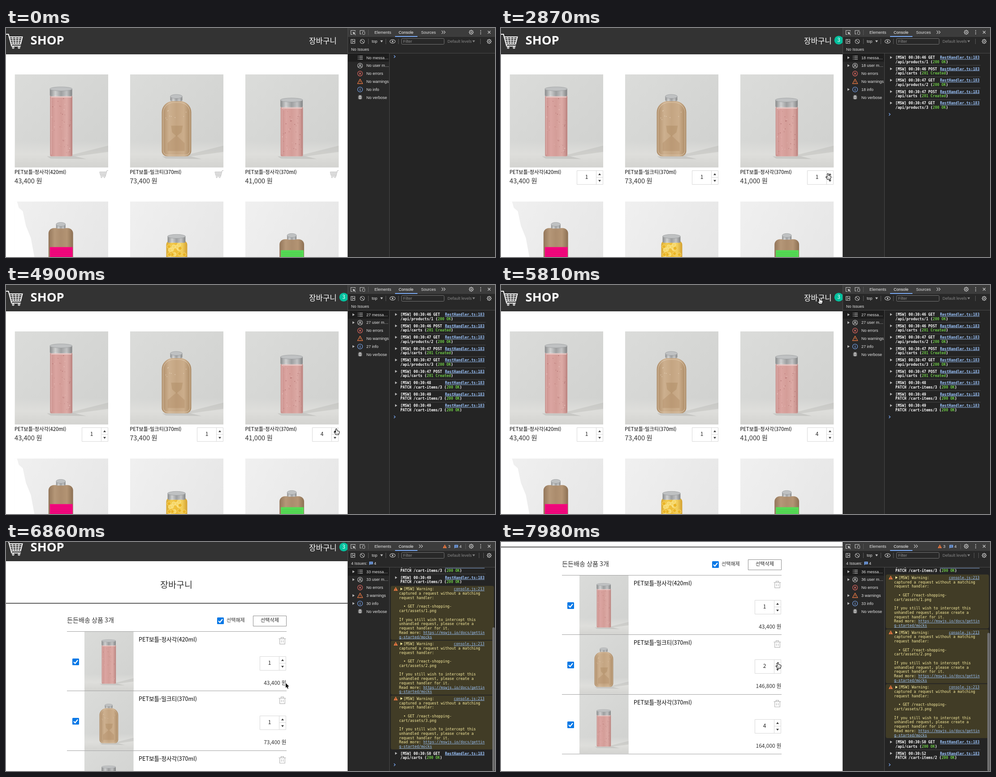
Animation, 1091 px wide and 513 px high, one loop 8000 ms. Source, as an HTML page with a canvas:

```html
<!DOCTYPE html>
<html lang="ko">
<head>
<meta charset="utf-8">
<title>Shop</title>
<style>
html, body { margin: 0; width: 100%; height: 100%; overflow: hidden; background: #fff; }
canvas { display: block; }
</style>
</head>
<body>
<canvas id="stage" width="1091" height="513"></canvas>
<script>
const g = document.getElementById('stage').getContext('2d');
const KR = '"Noto Sans CJK KR","Noto Sans KR","Noto Sans CJK JP",sans-serif';
const UI = '"Liberation Sans",Arial,sans-serif';
const MONO = '"DejaVu Sans Mono",monospace';
const LOOP = 8000, STEP = 70, CHAR = 4.9;
const CART_AT = 5880, IMAGES_AT = 6020, ISSUES_AT = 6160;

// ---------- helpers ----------
function text(s, x, y, font, color, align = 'left') {
  g.font = font; g.fillStyle = color; g.textAlign = align;
  g.fillText(s, x, y);
}
function rect(x, y, w, h, color) { g.fillStyle = color; g.fillRect(x, y, w, h); }
function frame(x, y, w, h, color, r = 0) {
  g.strokeStyle = color; g.lineWidth = 1;
  g.beginPath(); g.roundRect(x, y, w, h, r); g.stroke();
}
function poly(points, close) {
  g.beginPath();
  points.forEach(([x, y], i) => i ? g.lineTo(x, y) : g.moveTo(x, y));
  if (close) g.closePath();
}
function line(color, width, ...points) {
  g.strokeStyle = color; g.lineWidth = width;
  poly(points); g.stroke();
}
function shape(color, ...points) { g.fillStyle = color; poly(points, true); g.fill(); }
function disc(x, y, r, color) {
  g.fillStyle = color; g.beginPath(); g.arc(x, y, r, 0, 7); g.fill();
}
function ring(x, y, r, color, w = 1.1) {
  g.strokeStyle = color; g.lineWidth = w; g.beginPath(); g.arc(x, y, r, 0, 7); g.stroke();
}
function blend(x0, y0, x1, y1, ...colors) {
  const f = g.createLinearGradient(x0, y0, x1, y1);
  colors.forEach((c, i) => f.addColorStop(i / (colors.length - 1), c));
  return f;
}
function at(x, y, draw, sx = 1, sy = sx) {
  g.save(); g.translate(x, y); g.scale(sx, sy); draw(); g.restore();
}
function clip(x, y, w, h, draw) {
  g.save(); g.beginPath(); g.rect(x, y, w, h); g.clip(); draw(); g.restore();
}
function random(seed) {
  return () => (seed = (seed * 16807) % 2147483647) / 2147483647;
}
// keys: [time, a, b, ...]; linear between neighbours, flag taken from the left key
function tween(keys, t) {
  let i = 0;
  while (i < keys.length - 1 && keys[i + 1][0] <= t) i++;
  const a = keys[i], b = keys[i + 1] || a;
  const k = b === a ? 0 : Math.max(0, (t - a[0]) / (b[0] - a[0]));
  return a.map((v, n) => typeof v === 'number' ? v + (b[n] - v) * k : v);
}

// ---------- timeline ----------
const ARROW = 'arrow', HAND = 'hand';
const pointer = [
  [70, 873, 400, ARROW], [210, 520, 372, ARROW], [350, 258, 334, ARROW], [420, 222, 328, HAND],
  [630, 222, 327, HAND], [700, 222, 324, HAND], [840, 222, 324, HAND], [910, 214, 315, HAND],
  [980, 226, 327, HAND], [1050, 219, 325, HAND], [1400, 222, 326, ARROW], [1540, 401, 332, ARROW],
  [1680, 462, 328, ARROW], [1820, 475, 325, HAND], [2310, 477, 325, ARROW], [2520, 680, 331, ARROW],
  [2660, 729, 326, HAND], [3640, 731, 326, HAND], [3850, 731, 326, HAND], [4060, 737, 322, HAND],
  [5110, 737, 322, ARROW], [5460, 715, 70, ARROW], [5600, 711, 31, HAND], [5740, 711, 29, HAND],
  [5810, 711, 29, HAND], [5950, 711, 35, HAND], [6160, 711, 36, ARROW], [6370, 668, 190, ARROW],
  [6580, 624, 316, ARROW], [7280, 624, 316, ARROW], [7420, 620, 288, HAND], [7560, 618, 270, HAND]
];
const scrolling = [[6790, 0], [6860, 16], [6930, 62], [7000, 114], [7070, 142]];

function log(time, stamp, verb, path, status) { return { time, stamp, verb, path, status, h: 25.5 }; }
const logs = [];
[[1330, 46], [2100, 47], [2870, 47]].forEach(([t, s], i) => logs.push(
  log(t, s, 'GET', '/api/products/' + (i + 1), '200 OK'),
  log(t + 280, s, 'POST', '/api/carts', '201 Created')));
[[4200, 48], [4410, 49], [4900, 49]].forEach(([t, s]) =>
  logs.push(log(t, s, '', 'PATCH /cart-items/3', '200 OK')));
for (let n = 1; n <= 3; n++) logs.push({ time: CART_AT, warn: n, h: 122.75 });
logs.push(log(CART_AT, 50, 'GET', '/api/carts', '200 OK'),
  log(7840, 52, '', 'PATCH /cart-items/2', '200 OK'));

const count = (times, t) => times.filter(v => t >= v).length;
const added = [1330, 2100, 2870];
const raised = [4130, 4340, 4830];
const requests = [1330, 1330, 2100, 2100, 2870, 2870, 4200, 4410, 4900, CART_AT, 7770];

const products = [
  { name: 'PET보틀-정사각(420ml)', price: 43400 },
  { name: 'PET보틀-밀크티(370ml)', price: 73400 },
  { name: 'PET보틀-정사각(370ml)', price: 41000 }
];
const won = n => n.toLocaleString('en-US') + ' 원';

// ---------- product photos, on a 209 px square ----------
function lid(x, y, w, h) {
  g.fillStyle = blend(x, 0, x + w, 0, '#8d8f90', '#d7d8d8', '#a2a4a5', '#c9cacb', '#858788');
  g.beginPath(); g.roundRect(x, y + 3, w, h - 3, 3); g.fill();
  for (let i = 2; i < w - 1; i += 2.5) line('rgba(80,80,80,.25)', .6, [x + i, y + 8], [x + i, y + h - 2]);
  g.fillStyle = '#bfc1c2';
  g.beginPath(); g.ellipse(x + w / 2, y + 4.5, w / 2, 4.5, 0, 0, 7); g.fill();
  g.strokeStyle = '#949698'; g.lineWidth = .7; g.stroke();
}
function body(x, y, w, h, r, ...colors) {
  g.fillStyle = blend(x, 0, x + w, 0, ...colors);
  g.beginPath(); g.roundRect(x, y, w, h, r); g.fill();
}
function backdrop(light) {
  rect(0, 0, 209, 209, light ? blend(0, 0, 209, 120, '#f0f0f0', '#e6e6e6')
    : blend(0, 0, 209, 209, '#dbdcda', '#d5d6d4', '#cfd0ce'));
  if (light) return;
  rect(0, 150, 209, 59, blend(0, 150, 0, 209, 'rgba(224,224,221,0)', '#dededb', '#d3d3d0'));
  shape('rgba(150,150,146,.22)', [126, 181], [209, 160], [209, 174], [128, 185]);
  shape('rgba(140,140,136,.25)', [72, 184], [136, 184], [160, 190], [80, 189]);
}
function smoothie(top) {
  backdrop();
  const y = top + 18, rnd = random(top + 5);
  body(79, y, 50, 184 - y, [5, 5, 3, 3], '#c98f8b', '#dba5a1', '#d49d98', '#dcaaa5', '#c18a86');
  rect(81, y + 1, 46, 5, 'rgba(240,215,212,.65)');
  line('rgba(255,235,232,.4)', 1.2, [82, y + 6], [82, 180]);
  line('rgba(150,90,88,.35)', 1, [126.5, y + 6], [126.5, 181]);
  for (let i = 0; i < 45; i++)
    disc(83 + rnd() * 42, y + 8 + rnd() * (168 - y), .4 + rnd() * .6, i % 3 ? 'rgba(150,75,78,.55)' : 'rgba(255,225,220,.6)');
  lid(78.5, top, 50, 21);
}
function milkTea() {
  backdrop();
  rect(92, 57, 23, 6, '#cbb79f');
  body(71, 60, 66, 124, [25, 25, 12, 12], '#ad8c68', '#cdb08f', '#c4a582', '#cbad8b', '#a98863');
  g.strokeStyle = 'rgba(236,218,195,.55)'; g.lineWidth = 1.2;
  g.beginPath(); g.roundRect(74, 63, 60, 118, [23, 23, 10, 10]); g.stroke();
  shape('rgba(160,122,82,.3)', [92, 115], [118, 115], [115, 130], [104, 139], [94, 130]);
  shape('rgba(160,122,82,.28)', [104, 137], [122, 154], [122, 172], [84, 172], [84, 154]);
  const rnd = random(21);
  for (let i = 0; i < 9; i++) disc(80 + rnd() * 46, 78 + rnd() * 26, .8, 'rgba(245,230,210,.7)');
  lid(90, 45, 27, 15);
}
function labelled(left, top, color, labelY) {
  backdrop(true);
  if (left < 76) shape('#fff', [0, 0], [5, 0], [9, 14], [18, 22], [25, 55], [36, 82], [44, 125], [0, 125]);
  rect(left + 17, top + 11, 20, 6, '#b9a48c');
  body(left, top + 13, 55, 130, [12, 12, 4, 4], '#93765a', '#b59778', '#ab8c6d', '#b39474', '#8c7053');
  rect(left + 3, labelY, 51, 60, color);
  for (let i = 0; i < 5; i++) line('rgba(0,0,0,.14)', .8, [left + 5, labelY + 5 + i * 4], [left + 51, labelY + 5 + i * 4]);
  lid(left + 17, top, 21, 14);
}
function lemons() {
  backdrop(true);
  body(81, 88, 47, 121, [9, 9, 3, 3], '#d9aa35', '#f2ca4c', '#eebd37', '#f3d05c', '#d3a02f');
  const rnd = random(77);
  for (let i = 0; i < 22; i++) {
    const x = 87 + rnd() * 35, y = 97 + rnd() * 34;
    disc(x, y, 4.5, i % 2 ? '#f6d768' : '#eab526');
    ring(x, y, 4, 'rgba(255,240,170,.8)', .8);
  }
  lid(84, 74, 40, 19);
}
const photos = [
  () => smoothie(28), milkTea, () => smoothie(53),
  () => labelled(75.5, 47, '#f4077e', 102.5), lemons, () => labelled(76.5, 72, '#55dc55', 109.5)
];
function photo(i, x, y, w, h) {
  const k = Math.max(w, h) / 209;
  clip(x, y, w, h, () => at(x - (h - w) / 2, y, photos[i], k));
}

// ---------- page parts ----------
function trolley(color, w) {
  line(color, w, [0, 14], [5.5, 14], [12.5, 40.5], [33, 40.5]);
  line(color, w, [7, 20], [36.5, 20], [32.5, 36], [11.5, 36]);
  for (let i = 1; i < 4; i++) {
    line(color, w * .7, [7 + i * 7.3, 20], [11.5 + i * 5.2, 36]);
    line(color, w * .7, [7 + i, 20 + i * 4], [36.5 - i, 20 + i * 4]);
  }
  ring(16, 44, 1.8, color, w * .7);
  ring(29, 44, 1.8, color, w * .7);
}
function stepper(x, y, n) {
  rect(x, y, 59, 32, '#fff');
  frame(x + .5, y + .5, 58, 31, '#d8d8d8');
  line('#d8d8d8', 1, [x + 43.5, y], [x + 43.5, y + 32]);
  line('#d8d8d8', 1, [x + 43.5, y + 15.5], [x + 59, y + 15.5]);
  text(n, x + 22, y + 18.5, '12px ' + KR, '#222', 'center');
  shape('#333', [x + 48, y + 10.5], [x + 54, y + 10.5], [x + 51, y + 6.5]);
  shape('#333', [x + 48, y + 21.5], [x + 54, y + 21.5], [x + 51, y + 25.5]);
}
function checkbox(x, y) {
  g.fillStyle = '#0778e6'; g.beginPath(); g.roundRect(x, y, 15, 15, 1.5); g.fill();
  line('#fff', 2.2, [x + 3, y + 7.8], [x + 6.2, y + 11], [x + 12, y + 3.8]);
}
function bin(x, y) {
  const c = '#b5b5b5';
  line(c, 1.2, [x, y + 3.5], [x + 16, y + 3.5]);
  line(c, 1.2, [x + 5, y + 3], [x + 5, y + .6], [x + 11, y + .6], [x + 11, y + 3]);
  line(c, 1.2, [x + 2.2, y + 4], [x + 2.2, y + 15.5], [x + 13.8, y + 15.5], [x + 13.8, y + 4]);
  line(c, 1.2, [x + 6, y + 7], [x + 6, y + 12]);
  line(c, 1.2, [x + 10, y + 7], [x + 10, y + 12]);
}
function header(badge) {
  rect(0, 0, 762, 59, '#333');
  trolley('#fff', 2);
  text('SHOP', 54.5, 37, 'bold 27.5px "Noto Sans","Open Sans",sans-serif', '#fff');
  text('장바구니', 676, 35, '16.8px ' + KR, '#fff');
  if (!badge) return;
  disc(753.5, 27.3, 9.8, '#04c09e');
  text(badge, 753.5, 31, '12px ' + KR, '#fff', 'center');
}
function shop(t) {
  const inCart = count(added, t);
  header(inCart);
  for (let i = 0; i < 6; i++) {
    const x = 19.5 + (i % 3) * 257.2, y = i < 3 ? 104 : 388.5;
    photo(i, x, y, 208.5, 208.5);
    if (i > 2) continue;
    text(products[i].name, x - .5, 327, '11.2px ' + KR, '#000');
    text(won(products[i].price), x - .5, 348, '14.7px ' + KR, '#333');
    if (i < inCart) stepper(Math.round(x + 149.4), 319, i === 2 ? 1 + count(raised, t) : 1);
    else at(x + 208.5, 312, () => trolley('#a8a8a8', 1.6), -.52, .52);
  }
}
function cart(t) {
  header(3);
  text('장바구니', 380, 119, '500 19.6px ' + KR, '#333', 'center');
  rect(0, 152.5, 762, 1.6, '#333');
  text('든든배송 상품 3개', 136, 196, '14.1px ' + KR, '#333');
  checkbox(471, 185);
  text('선택해제', 492, 195.3, '11.1px ' + KR, '#333');
  frame(551.5, 181.5, 74, 23, '#8c8c8c');
  text('선택삭제', 588.5, 195.3, '500 11.1px ' + KR, '#222', 'center');
  products.forEach((p, i) => {
    const y = 216.7 + i * 133.4, n = [1, t >= 7700 ? 2 : 1, 4][i];
    if (t >= IMAGES_AT) photo(i, 175, y, 109.5, 132.6);
    rect(136, Math.round(y - .7), 490, 1, '#a0a0a0');
    text(p.name, 296, y + 22, '12.6px ' + KR, '#000');
    bin(608.5, y + 12.5);
    checkbox(148, Math.round(y + 60));
    stepper(566, Math.round(y + 55), n);
    text(won(p.price * n), 625.5, y + 119, '12px ' + KR, '#333', 'right');
  });
  rect(136, 616.5, 490, 1, '#a0a0a0');
}

// ---------- developer tools ----------
const GREY = '#c4c4c4', EDGE = '#4b4b4b';
function ui(s, x, y, color = '#e3e3e3') { text(s, x, y, '9px ' + UI, color); }
function caret(x, y, color = '#b5b5b5') { shape(color, [x - 2, y - 3], [x + 3, y], [x - 2, y + 3]); }
function down(x, y, color) { shape(color, [x - 3, y - 2], [x + 3, y - 2], [x, y + 2.5]); }
function gear(x, y) {
  for (let i = 0; i < 8; i++) {
    const c = Math.cos(i * Math.PI / 4), s = Math.sin(i * Math.PI / 4);
    line(GREY, 1.7, [x + c * 3.6, y + s * 3.6], [x + c * 5.4, y + s * 5.4]);
  }
  ring(x, y, 3.7, GREY, 1.2);
  disc(x, y, 1.5, GREY);
}
function warnMark(x, y, s, filled) {
  const pts = [[x, y - s], [x + s, y + s * .85], [x - s, y + s * .85]];
  if (filled) shape('#ee7b44', ...pts);
  else line('#ee7b44', 1.2, ...pts, pts[0]);
  line(filled ? '#3a2a1a' : '#ee7b44', 1, [x, y - s * .3], [x, y + s * .25]);
  disc(x, y + s * .58, .6, filled ? '#3a2a1a' : '#ee7b44');
}
function bubble(x, y) {
  shape('#7cacf8', [x - 4, y - 3.5], [x + 4, y - 3.5], [x + 4, y + 2.5], [x - 2, y + 2.5], [x - 4, y + 4.5]);
  line('#28354c', .8, [x - 2.4, y - 1.5], [x + 2.4, y - 1.5]);
  line('#28354c', .8, [x - 2.4, y + .5], [x + 2.4, y + .5]);
}
function chevrons(x, y) {
  [0, 4.5].forEach(d => line(GREY, 1.1, [x + d, y - 3.5], [x + d + 3.5, y], [x + d, y + 3.5]));
}
function noEntry(x, y, r) {
  ring(x, y, r, GREY);
  line(GREY, 1.1, [x - r * .7, y - r * .7], [x + r * .7, y + r * .7]);
}
function toolbar(issues, warned) {
  rect(762, 0, 329, 20, '#3c3c3c');
  line(GREY, 1.1, [773, 14.5], [769.5, 14.5], [769.5, 5.5], [779, 5.5], [779, 8]);
  shape(GREY, [773.5, 8.5], [780.5, 11.3], [777.3, 12.2], [780.5, 15.3], [779.3, 16], [776.3, 13], [775, 15.5]);
  line(GREY, 1.1, [793, 13.5], [790, 13.5], [790, 5.5], [800, 5.5]);
  frame(795.5, 8, 5, 6.5, GREY, 1);
  [[808.5, 4], [808.5, 24], [847.5, 24], [875.5, 24]].forEach(([x, y]) => line('#5a5a5a', 1, [x, y], [x, y + 12]));
  ui('Elements', 822, 13);
  ui('Console', 876, 13, '#fff');
  rect(868, 18, 50, 2, '#7cacf8');
  if (!issues) ui('Sources', 926, 13);
  chevrons(issues ? 921.5 : 972, 9.5);
  if (warned) {
    const x = issues ? 979 : 1004.5;
    warnMark(x, 10, 4.5, true);
    ui(issues ? 3 : 1, x + 7.5, 13);
    if (issues) { bubble(1004.5, 10); ui(4, 1011.5, 13); }
    line('#5a5a5a', 1, [1025.5, 4], [1025.5, 16]);
  }
  gear(1038, 9.5);
  [5.8, 9.5, 13.2].forEach(y => disc(1059, y, 1.1, GREY));
  line(GREY, 1.2, [1075, 6.5], [1081, 12.5]);
  line(GREY, 1.2, [1081, 6.5], [1075, 12.5]);

  frame(769.5, 25.5, 9, 9, GREY);
  line(GREY, 1.1, [772.5, 25], [772.5, 35]);
  shape(GREY, [777, 27.5], [777, 32.5], [774, 30]);
  noEntry(795, 30, 4.8);
  ui('top', 816, 33);
  down(838, 29.8, GREY);
  g.strokeStyle = GREY; g.lineWidth = 1.1;
  g.beginPath(); g.ellipse(862.5, 30, 6, 3.9, 0, 0, 7); g.stroke();
  disc(862.5, 30, 1.8, GREY);
  frame(882.5, 23.5, 95, 13, '#757575', 2);
  ui('Filter', 886, 33.3, '#8d8d8d');
  ui('Default levels', 985, 33, '#858585');
  down(1043.5, 29.8, '#858585');
  (warned ? [1055.5, 1065.5] : [1058.5]).forEach(x => line('#5a5a5a', 1, [x, 24], [x, 36]));
  gear(1078, 30);
  ui(issues ? '4 Issues:' : 'No Issues', 770, 50.5);
  if (issues) { bubble(814.5, 47.5); ui(4, 821, 50.5); }
}
function fit(s, width) {
  g.font = '9px ' + UI;
  if (g.measureText(s).width <= width) return s;
  while (g.measureText(s + '…').width > width) s = s.slice(0, -1);
  return s + '…';
}
const marks = [
  y => [-3.5, 0, 3.5].forEach(d => {
    rect(785, y + d - .6, 1.6, 1.2, GREY); rect(788, y + d - .6, 8, 1.2, GREY);
  }),
  y => {
    ring(790, y, 5.5, GREY); ring(790, y - 1.5, 1.8, GREY);
    g.beginPath(); g.arc(790, y + 5, 4, 3.6, 5.8); g.stroke();
  },
  y => {
    ring(790, y, 5.5, '#e46962');
    line('#e46962', 1.2, [787.8, y - 2.2], [792.2, y + 2.2]);
    line('#e46962', 1.2, [792.2, y - 2.2], [787.8, y + 2.2]);
  },
  y => warnMark(790, y, 5.6),
  y => { ring(790, y, 5.5, '#7cacf8'); rect(789.4, y - .8, 1.3, 3.8, '#7cacf8'); rect(789.4, y - 3, 1.3, 1.3, '#7cacf8'); },
  y => {
    [-2.5, 0, 2.5].forEach(d => line(GREY, 1, [785.5, y + d], [794.5, y + d]));
    rect(787.5, y - 4, 5, 8, GREY);
    rect(789, y - 1.6, 2, .9, '#282828'); rect(789, y + .8, 2, .9, '#282828');
    line(GREY, 1, [787.5, y - 5.5], [790, y - 3.5], [792.5, y - 5.5]);
  }
];
function sidebar(t) {
  const info = 3 * count(requests, t), warns = t >= CART_AT ? 3 : 0, all = info + warns;
  rect(762, 57, 93, 18.5, '#1d1d1d');
  [[all, 'messages'], [all, 'user messages'], [0, 'errors'], [warns, 'warnings'], [info, 'info'], [0, 'verbose']]
    .forEach(([n, label], i) => {
      const y = 66.5 + i * 17.8;
      if (n) caret(775, y);
      marks[i](y);
      ui(fit((n || 'No') + ' ' + label, 51), 804, y + 3);
    });
}
function mono(s, x, y, color, bold) { text(s, x, y + 3, (bold ? 'bold ' : '') + '8.14px ' + MONO, color); }
function link(s, x, y, bold) {
  mono(s, x, y, '#9cc4fb', bold);
  rect(x, y + 4, s.length * CHAR, .8, '#9cc4fb');
}
function logRow(m, y, divided) {
  if (divided) rect(880, Math.round(y - 8.5), 190, 1, '#474747');
  caret(870, y);
  mono(`[MSW] 00:30:${m.stamp} ${m.verb}`, 880, y, '#fff', true);
  link('RestHandler.ts:183', 979.5, y, true);
  mono(m.path + ' (', 880, y + 9.7, '#fff', true);
  const x = 880 + (m.path.length + 2) * CHAR;
  mono(m.status, x, y + 9.7, '#6cc644', true);
  mono(')', x + m.status.length * CHAR, y + 9.7, '#fff', true);
}
function warnRow(m, y) {
  const c = '#fbefa0', row = i => y + i * 9.76;
  g.fillStyle = '#413c26'; g.beginPath(); g.roundRect(858.5, y - 7, 230, 121, 4); g.fill();
  warnMark(869.5, y, 4.6, true);
  caret(882, y, c);
  mono('[MSW] Warning:', 887, y, c);
  link('console.js:213', 999, y);
  ['captured a request without a matching', 'request handler:', '', '  • GET /react-shopping-',
    `cart/assets/${m.warn}.png`, '', 'If you still wish to intercept this',
    'unhandled request, please create a', 'request handler for it.', 'Read more: ']
    .forEach((s, i) => mono(s, 877, row(i + 1), c));
  link('https://mswjs.io/docs/gettin', 877 + 11 * CHAR, row(10));
  link('g-started/mocks', 877, row(11));
}
function consolePane(t) {
  const list = logs.filter(m => t >= m.time);
  const total = list.reduce((sum, m) => sum + m.h, 0);
  const scroll = Math.max(0, total - 433);
  let y = 66 - scroll;
  list.forEach((m, i) => {
    if (m.warn) warnRow(m, y);
    else logRow(m, y, i && !list[i - 1].warn);
    y += m.h;
  });
  if (!list.length) y = 64;
  line('#7cacf8', 1.2, [865.5, y - 2.8], [868.5, y], [865.5, y + 2.8]);
  if (scroll) {
    const thumb = 456 * 456 / (456 + scroll);
    g.fillStyle = '#6e6e6e';
    g.beginPath(); g.roundRect(1085, 513 - thumb, 5.5, thumb, 2.5); g.fill();
  }
}
function devtools(t) {
  rect(762, 0, 329, 513, '#282828');
  rect(856, 57, 235, 456, '#242424');
  toolbar(t >= ISSUES_AT, t >= CART_AT);
  sidebar(t);
  clip(856, 57, 235, 456, () => consolePane(t));
  rect(762, 56, 329, 1, EDGE);
  rect(855, 57, 1, 456, EDGE);
  rect(762, 0, 1, 513, EDGE);
}

// ---------- pointer ----------
function drawPointer(t) {
  if (t < pointer[0][0]) return;
  const [, x, y, kind] = tween(pointer, t);
  at(x, y, () => {
    g.lineJoin = 'round';
    if (kind === HAND) {
      poly([[-1.5, 1], [0, 0], [1.4, 1], [1.6, 5], [4, 5], [6.5, 6], [7, 8], [6, 11], [5, 13.5], [-1, 13.5],
        [-3, 10.5], [-4.8, 8], [-4, 7], [-1.6, 8.4]], true);
      g.fillStyle = '#fff'; g.fill();
      g.strokeStyle = '#111'; g.lineWidth = 1.1; g.stroke();
      [0, 2, 4].forEach(d => line('#555', .7, [d, 9], [d, 12]));
    } else {
      poly([[0, 0], [0, 10.6], [2.4, 8.5], [4.2, 12.6], [6, 11.8], [4.3, 7.9], [7.4, 7.6]], true);
      g.strokeStyle = '#fff'; g.lineWidth = 2; g.stroke();
      g.fillStyle = '#000'; g.fill();
    }
  });
}

function draw(t) {
  rect(0, 0, 1091, 513, '#fff');
  clip(0, 0, 762, 513, () => {
    if (t < CART_AT) return shop(t);
    g.translate(0, -Math.round(tween(scrolling, t)[1]));
    cart(t);
  });
  devtools(t);
  drawPointer(t);
}
const start = performance.now();
function tick() {
  const t = (performance.now() - start) % LOOP;
  draw(Math.floor(t / STEP) * STEP);
  requestAnimationFrame(tick);
}
tick();
</script>
</body>
</html>
```
